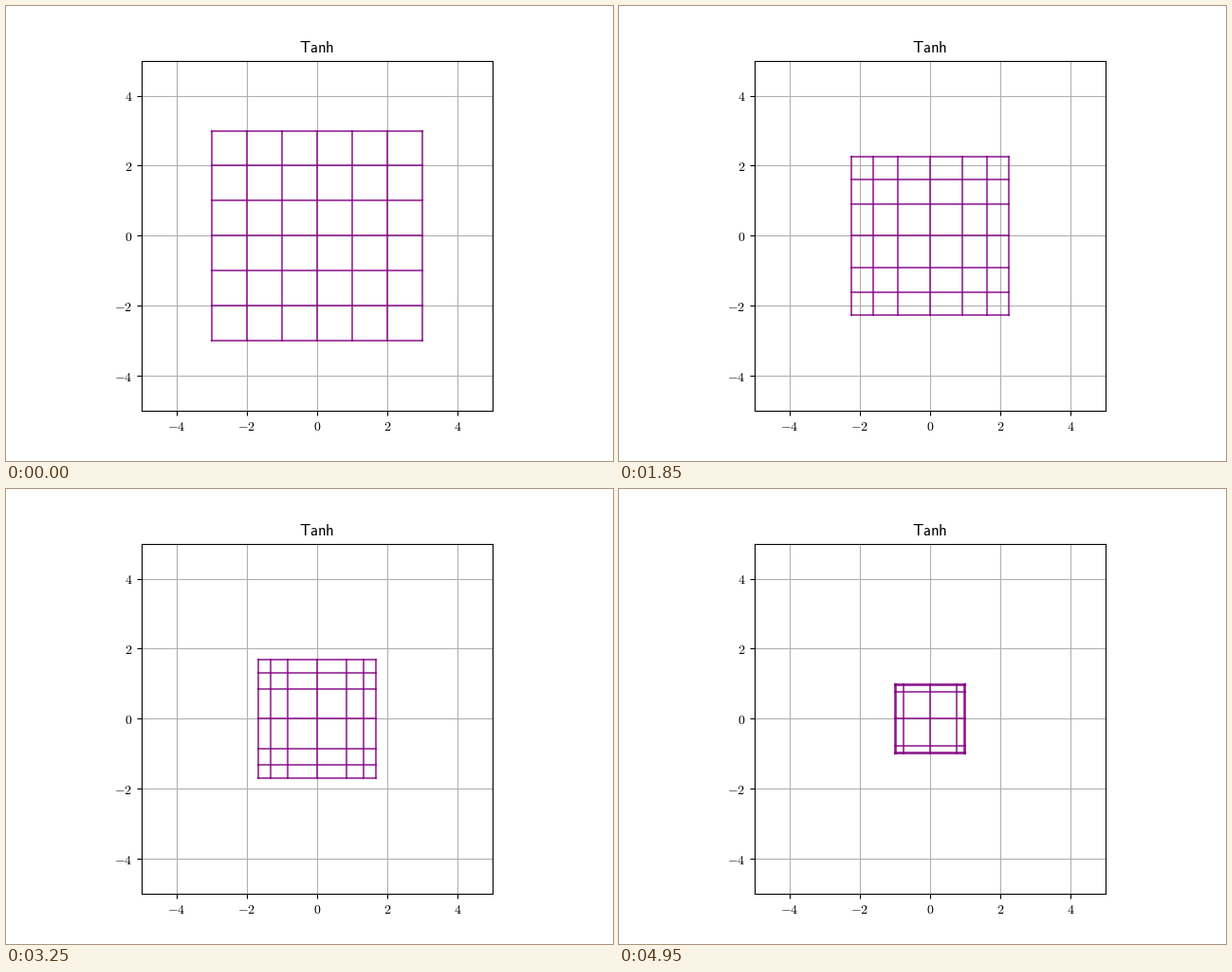
A matplotlib script for the animation above (5000 ms loop, 640 by 480 pixels).

```python
import numpy as np
import matplotlib.pyplot as plt
from matplotlib.animation import FuncAnimation

FRAMES = 100
INTERVAL = 50
LIMIT = 5
EXTENT = 3

plt.rcParams["mathtext.fontset"] = "cm"

fig, ax = plt.subplots(figsize=(6.4, 4.8), dpi=100)
ax.set_aspect("equal")
ax.set(xlim=(-LIMIT, LIMIT), ylim=(-LIMIT, LIMIT))
ax.grid(True)
ax.set_title(r"$\mathsf{Tanh}$", fontsize=12)

ticks = range(-4, 5, 2)
labels = [f"${t}$" for t in ticks]
ax.set_xticks(ticks, labels)
ax.set_yticks(ticks, labels)

levels = np.arange(-EXTENT, EXTENT + 1)


def make_lines():
    return [ax.plot([], [], color="purple", lw=1.5, alpha=0.7)[0] for _ in levels]


columns = make_lines()
rows = make_lines()


def update(frame):
    t = frame / (FRAMES - 1)
    pos = (1 - t) * levels + t * np.tanh(levels)
    ends = [pos[0], pos[-1]]
    for p, column, row in zip(pos, columns, rows):
        column.set_data([p, p], ends)
        row.set_data(ends, [p, p])
    return columns + rows


anim = FuncAnimation(fig, update, frames=FRAMES, interval=INTERVAL,
                     repeat=True, repeat_delay=0)
plt.show()
```
